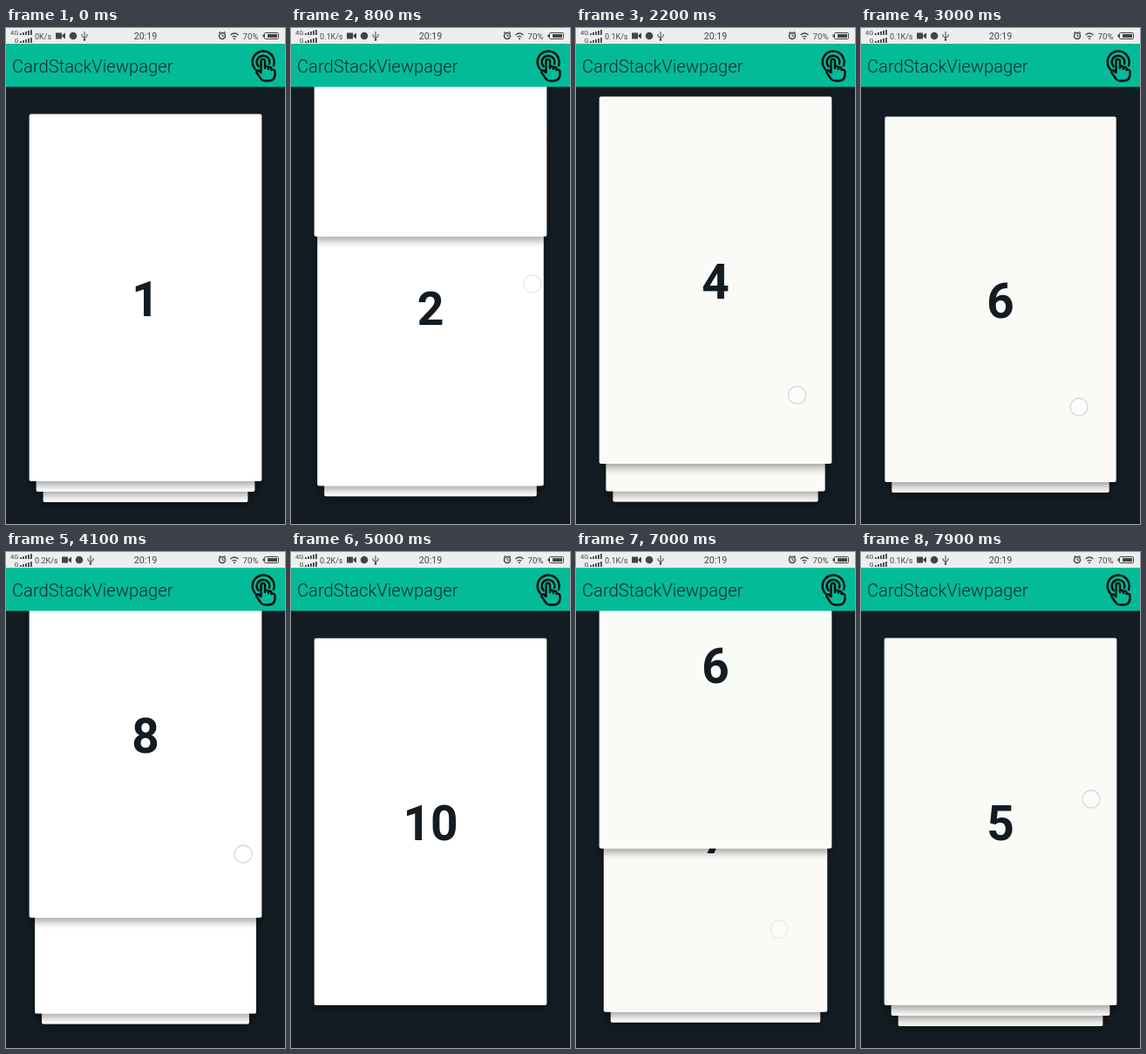
An HTML page for the animation above (8000 ms loop, 320x568 px).

```html
<!DOCTYPE html>
<html lang="en">
<head>
<meta charset="utf-8">
<title>Card stack</title>
<style>
  html, body { margin: 0; width: 100%; height: 100%; overflow: hidden; background: #121c22; }
  svg { display: block; width: 320px; height: 568px; font-family: Roboto, "Liberation Sans", sans-serif; }
  .digit { font-size: 55px; font-weight: bold; fill: #121c22; text-anchor: middle; }
  .title { font-size: 20.2px; font-weight: 300; fill: #062a28; }
  .status { fill: #444; }
  .line { fill: none; stroke: #444; }
  .icon { fill: none; stroke: #07110f; stroke-width: 2.5; stroke-linecap: round; stroke-linejoin: round; }
</style>
</head>
<body>
<svg viewBox="0 0 320 568">
  <defs>
    <filter id="shadow" x="-10%" y="-10%" width="120%" height="120%">
      <feDropShadow dx="0" dy="5" stdDeviation="4.5" flood-color="#000" flood-opacity=".33"/>
    </filter>
  </defs>
  <rect width="320" height="568" fill="#121c22"/>
  <g id="cards"></g>
  <circle id="touch" r="10" fill="#fff" fill-opacity=".4" stroke="#d8d8e0" stroke-width="1.3"/>

  <rect y="18" width="320" height="49.5" fill="#04bb99"/>
  <text class="title" x="7" y="51">CardStackViewpager</text>
  <g class="icon">
    <path d="M286 47.5A12.5 12.5 0 1 1 307 43"/>
    <path d="M289.6 44A7.3 7.3 0 1 1 302 41"/>
    <path d="M292.500 51V38q0-2.300 2.300-2.300T297 38v8-2q2.500-1 4 1v2-2q2.500-1 3.500 1v2q3.500-1 4 2V54q-1 6.500-7 6.500h-4q-4 0-6-3.500l-4-6q-1-3 2-2.500z"/>
  </g>

  <rect width="320" height="18" fill="#eee"/>
  <g class="status">
    <text x="5" y="8" font-size="7.5">4G</text>
    <text x="9.5" y="17" font-size="7.5">G</text>
    <g id="signal"></g>
    <text id="speed" x="33" y="12.7" font-size="9"></text>
    <g id="notices">
      <path d="M57 5.5h7v7h-7zM64.5 8l3.500-2.500v7l-3.500-2.500z"/>
      <circle cx="77" cy="9" r="4.3"/>
      <path class="line" d="M90 4v10M87 7v2.500l3 2 3-2V7"/>
      <circle cx="90" cy="13.5" r="1.3"/>
    </g>
    <text x="160" y="13" font-size="10.7" text-anchor="middle">20:19</text>
    <circle class="line" cx="248" cy="9" r="3.5" stroke-width="1.5"/>
    <path class="line" d="M248 7v2.300h2M244 6l2-2M252 6l-2-2"/>
    <path class="line" d="M257.500 8q4.500-4 9 0M259.500 10.300q2.500-2 5 0" stroke-width="1.2"/>
    <circle cx="262" cy="12.3" r="1"/>
    <text x="271.500" y="12.7" font-size="9.7">70%</text>
    <rect class="line" x="296.5" y="5.5" width="16" height="7" rx="1"/>
    <rect x="294.5" y="7.5" width="1.5" height="3"/>
    <rect x="300" y="7" width="11" height="4"/>
  </g>
</svg>
<script>
const LOOP = 8000, TICK = 100, PAGE = 501, COUNT = 10;
const CARD_W = 266.6, CARD_H = 420.4;
const DRAG = 150, SETTLE = 350, DRAG_SHARE = 0.3, FADE = 130;
const $ = id => document.getElementById(id);
const clamp = v => Math.max(0, Math.min(1, v));

// Each swipe: start time, direction, touch-down point
const swipe = (start, dir, x, y) => ({ start, dir, x, y });
const up = (start, x = 250, y = 440) => swipe(start, 1, x, y);
const down = (start, x = 260, y = 285) => swipe(start, -1, x, y);
const swipes = [
  up(600), up(1174), up(1690), up(2180), up(2670), up(3060, 250, 434),
  up(3530), up(4000, 254, 444), up(4550),
  down(5597), down(6020, 258, 292), down(6400), down(6780), down(7250), down(7980, 264, 283)
];

function add(parent, tag, attrs, text = "") {
  const el = document.createElementNS("http://www.w3.org/2000/svg", tag);
  for (const key in attrs) el.setAttribute(key, attrs[key]);
  el.textContent = text;
  parent.append(el);
  return el;
}

// Later cards lie beneath earlier ones
const cards = [];
for (let n = COUNT; n >= 1; n--) {
  const el = add($("cards"), "g", {});
  const fill = n >= 4 && n <= 7 ? "#fafaf7" : "#fff";
  add(el, "rect", {
    x: -CARD_W / 2, y: -CARD_H / 2, width: CARD_W, height: CARD_H, rx: 2, fill, filter: "url(#shadow)"
  });
  add(el, "text", { class: "digit", y: 21 }, n);
  cards.push({ n, el });
}

for (const base of [8, 17])
  for (let i = 0; i < 5; i++)
    add($("signal"), "rect", { x: 16 + i * 3, y: base - 2 - i, width: 1.8, height: 2 + i });

function progress(u) {
  if (u < DRAG) return DRAG_SHARE * clamp(u / DRAG);
  const rest = 1 - clamp((u - DRAG) / SETTLE);
  return 1 - (1 - DRAG_SHARE) * rest ** 3;
}

function drawCards(page) {
  for (const { n, el } of cards) {
    const depth = n - page;
    const scale = 1 - 0.06 * Math.max(0, depth);
    const y = 308.8 + depth * (depth < 0 ? PAGE : 24.6);
    el.setAttribute("transform", `translate(160 ${y}) scale(${scale})`);
    el.setAttribute("display", depth > -1 && depth < 2.001 ? "inline" : "none");
  }
}

function drawTouch(t) {
  const touch = $("touch");
  const active = swipes.find(s => t >= s.start - 100 && t < s.start + DRAG + FADE);
  touch.setAttribute("display", active ? "inline" : "none");
  if (!active) return;
  const u = t - active.start, moved = clamp(u / DRAG) * active.dir;
  touch.setAttribute("cx", active.x + 27 * moved);
  touch.setAttribute("cy", active.y - 147 * moved);
  touch.setAttribute("opacity", 1 - clamp((u - DRAG) / FADE));
}

function drawSpeed(t) {
  const speed = t < 700 ? "0" : t >= 3700 && t < 6500 ? "0.2" : "0.1";
  $("speed").textContent = speed + "K/s";
  // A longer readout pushes the icons after it
  $("notices").setAttribute("transform", `translate(${speed.length > 1 ? 7 : 0} 0)`);
}

function render(now) {
  const t = Math.floor((now % LOOP) / TICK) * TICK;
  drawCards(swipes.reduce((page, s) => page + s.dir * progress(t - s.start), 1));
  drawTouch(t);
  drawSpeed(t);
}

const begin = performance.now();
function loop() {
  render(performance.now() - begin);
  requestAnimationFrame(loop);
}
loop();
</script>
</body>
</html>
```
